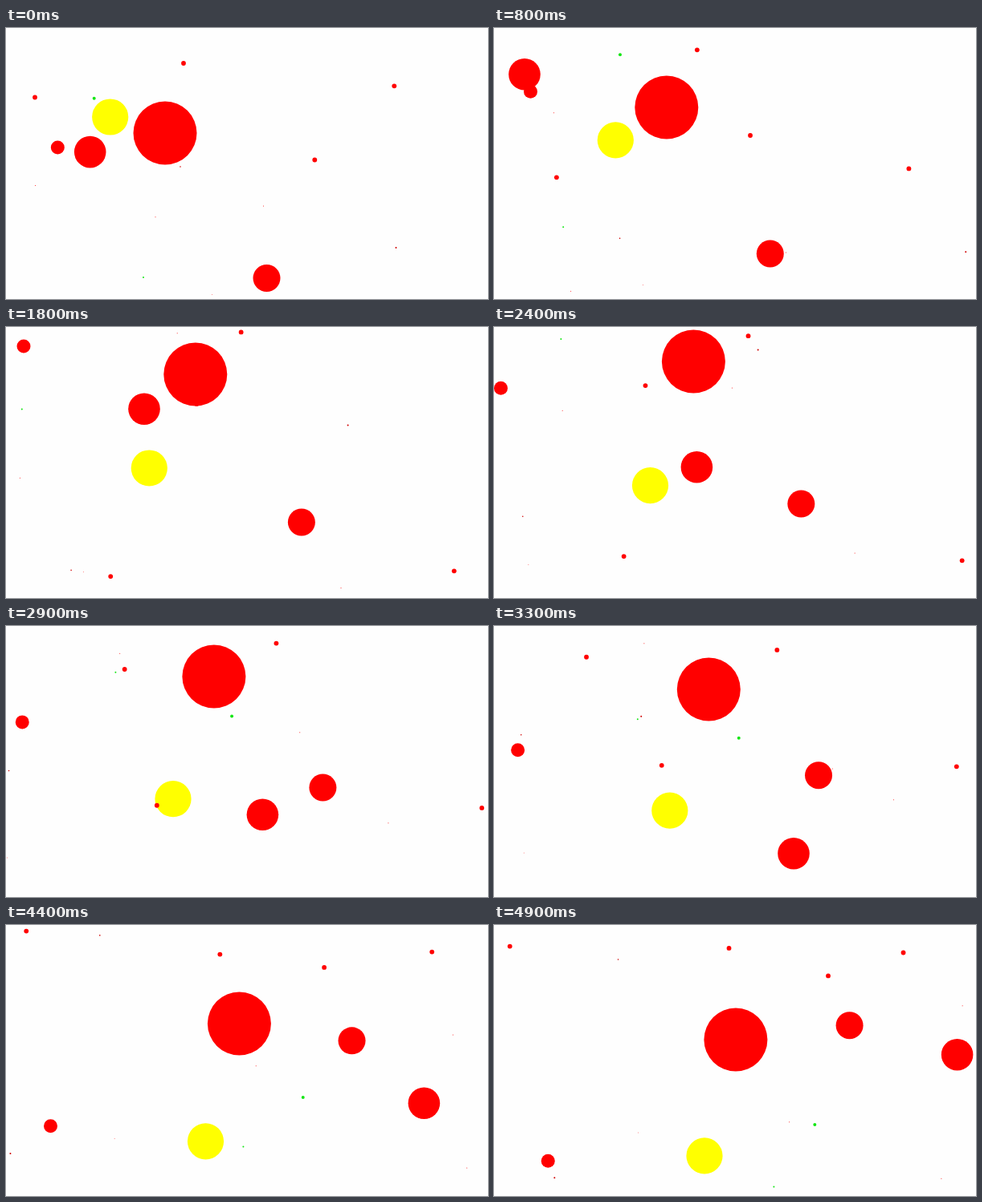
Animation, 600 px wide and 338 px high, one loop 5 s. Source, as an HTML page with a canvas:

```html
<!DOCTYPE html>
<html lang="en">
<head>
<meta charset="utf-8">
<title>Bouncing balls</title>
<style>
  html, body { margin: 0; width: 100%; height: 100%; overflow: hidden; background: #fefefe; }
  canvas { display: block; }
</style>
</head>
<body>
<canvas id="stage" width="600" height="338"></canvas>
<script>
const W = 600, H = 338, STEP = 100, STEPS = 50;
const RED = '#ff0000', GREEN = '#14e614', YELLOW = '#ffff00', DARK = '#d00000';
const ctx = document.getElementById('stage').getContext('2d');

// Position in px, velocity in px per step; walls are where the centre turns round.
const ball = (color, r, x, vx, y, vy, walls = {}) =>
  ({ color, r, x, vx, y, vy, l: r, t: r, right: W - r, b: H - r, ...walls });

const balls = [
  ball(GREEN, 2, 109.7, 5.91, 87.7, -6.82, { t: 1.25 }),
  ball(GREEN, 1, 171, -10.6, 311, 14.58, { l: 0, t: 0, b: 338 }),
  ball(RED, 0.5, 320.5, 5.36, 222, 7.25, { b: 339 }),
  ball(RED, 0.4, 256.5, -8.9, 332.5, -1.5, { l: 0 }),
  ball(RED, 0.5, 36.5, -13.87, 196.5, -11.35, { l: 0, t: 0, right: 600, b: 338 }),
  ball(RED, 0.5, 186, -11.3, 235.7, 14, { l: 0, t: 0, b: 338 }),
  ball(DARK, 0.8, 217, -7.55, 173, 11.17, { t: 0, b: 338.7 }),
  ball(DARK, 1, 485.5, 16.16, 274, 15.68, { l: 0, t: 0, right: 601, b: 339.4 }),
  ball(YELLOW, 22.6, 129.7, 2.7, 111, 3.61),
  ball(RED, 39.5, 198, 2.1, 131, -4, { t: 39 }),
  ball(RED, 19.8, 104.7, -13.4, 154.6, -12.1, { l: 17.75, t: 19.5, right: 582, b: 319.5 }),
  ball(RED, 17, 324.5, 2.41, 312, -3.81),
  ball(RED, 8.5, 64.3, -2.35, 149, -8.72, { l: 8.2, t: 8 }),
  ball(RED, 2.9, 221, 3.98, 44, -2.09, { t: 2.5 }),
  ball(RED, 2.9, 36, 5.235, 86.5, 12.475, { t: 1.55, b: 336 }),
  ball(RED, 2.9, 483.3, 4.14, 72.3, 12.89, { t: 1.8, right: 597.85, b: 336.5 }),
  ball(RED, 2.9, 384.3, -8.16, 164.5, -3.81, { l: 2.1, t: 2.2 })
];

// Reflects a straight path between two walls.
function bounce(p, lo, hi) {
  const span = hi - lo, period = 2 * span;
  const d = (((p - lo) % period) + period) % period;
  return lo + (d > span ? period - d : d);
}

function draw(n) {
  ctx.fillStyle = '#fefefe';
  ctx.fillRect(0, 0, W, H);
  for (const b of balls) {
    ctx.fillStyle = b.color;
    ctx.beginPath();
    ctx.arc(bounce(b.x + b.vx * n, b.l, b.right),
            bounce(b.y + b.vy * n, b.t, b.b), b.r, 0, Math.PI * 2);
    ctx.fill();
  }
}

let start;
function tick(now) {
  start ??= now;
  draw(Math.floor((now - start) / STEP) % STEPS);
  requestAnimationFrame(tick);
}
draw(0);
requestAnimationFrame(tick);
</script>
</body>
</html>
```
